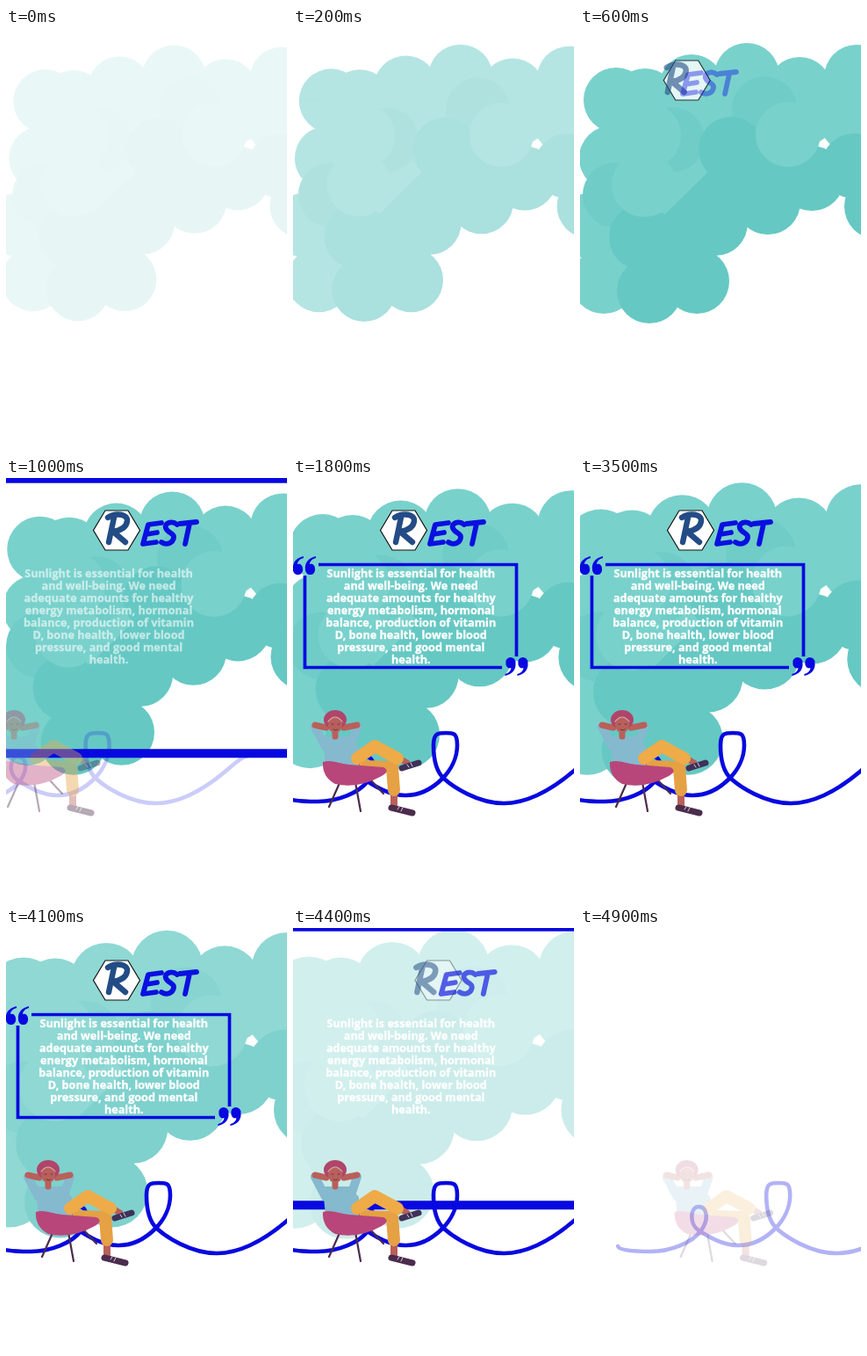
Write an HTML page that moves like this. It is 320x480 px and loops after 5000 ms.

```html
<!DOCTYPE html>
<html lang="en">
<head>
<meta charset="utf-8">
<title>Rest</title>
<style>
  html, body { margin: 0; width: 100%; height: 100%; overflow: hidden; background: #fff; }
  svg { display: block; width: 100vw; height: 100vh; }
  #copy { font: 700 12.65px "Open Sans", sans-serif; fill: #fff; stroke: #fff; stroke-width: .35; text-anchor: middle; }
  .line { fill: none; stroke-linecap: round; stroke-linejoin: round; }
  .blue { stroke: #0808e0; }
  .skin { stroke: #b9605a; }
  .shirt { stroke: #85b9ce; }
  .dark { stroke: #4b2c4d; }
</style>
</head>
<body>
<svg viewBox="0 0 320 480" xmlns="http://www.w3.org/2000/svg">
  <g id="cloud"></g>

  <path id="hex" d="M99.5 59.5 113 37H139L152.5 59.5 139 82H113Z" fill="#fff" stroke="#111" stroke-width="1.2"/>
  <g id="initial" class="line" stroke="#234c86" stroke-width="6.4" role="img" aria-label="R">
    <path d="M123 45 117 73M116 45C125 39 139 41 138 49S128 60 122 61L136 73"/>
  </g>
  <g id="rest" class="line" stroke="#0a10e0" stroke-width="5.8" role="img" aria-label="EST">
    <path d="M177 51 162 53 156 75 171 73M160 64 172 62"/>
    <path d="M195 53C189 48 180 51 182 57S192 62 191 68S183 77 177 73"/>
    <path d="M198 52 217 50M209 52 204 75"/>
  </g>

  <g id="frame">
    <path class="blue" d="M13.5 111V215.5H238M29 98.5H254.5V203" fill="none" stroke-width="3.7"/>
    <g id="quotes" fill="#0808e0">
      <path id="mark" d="M12 89C3 91-1 97 0 104A5.6 5.6 0 1 0 11 103C11 99 8 97 5 98C5 95 8 92 12 91Z"/>
      <use href="#mark" x="14"/>
    </g>
    <use href="#quotes" transform="rotate(180 133.7 157)"/>
  </g>

  <g id="copy"></g>

  <path id="ribbon" class="line blue" stroke-width="4.6" d="M-9 362C-8 366 5 368 28 368S75 358 85 345S93 317 83 317S72 337 83 344
    S110 361 128 361S160 352 170 342S187 318 187 304S183 290 174 290S160 290 160 304S162 333 172 342
    S210 370 240 370S300 350 320 333S340 317 348 315"/>

  <g id="person" class="line">
    <path class="dark" d="M53 347 41 374M71 346 77 379M88 343 103 359" stroke-width="2.2"/>
    <!-- standing leg -->
    <path class="skin" d="M115 360V374" stroke-width="8"/>
    <path d="M82 328 113 329 115 355" stroke="#e5a143" stroke-width="14"/>
    <path class="dark" d="M112 375 136 381" stroke-width="7"/>
    <!-- torso, raised arms and head -->
    <path d="M34 294H64L75 306V328H37Z" fill="#85b9ce"/>
    <path class="shirt" d="M25 283 37 306M73 283 66 304" stroke-width="10"/>
    <path class="skin" d="M25 281 38 284M73 281 58 284M48 284V294" stroke-width="7"/>
    <ellipse cx="48" cy="275" rx="13" ry="11" fill="#b0456a"/>
    <ellipse cx="48" cy="281" rx="8" ry="9" fill="#b9605a"/>
    <path d="M40 277Q48 267 56 277" stroke="#dbb0b8" stroke-width="1.2"/>
    <path class="dark" d="M44 280H46M51 280H53M46 286Q49 288 51 286" stroke-width=".8"/>
    <!-- chair -->
    <path d="M34 323C44 320 52 325 64 326L103 329Q111 333 101 339Q74 354 48 348Q33 340 34 323Z" fill="#b8467a"/>
    <!-- crossed leg -->
    <path class="skin" d="M121 319 130 324" stroke-width="7"/>
    <path d="M73 319 93 305 119 319" stroke="#eeab48" stroke-width="14"/>
    <path d="M124 330 143 324" stroke="#3f3158" stroke-width="7"/>
    <path d="M130 326 132 329M134 324 136 328M121 374 119 377M125 375 123 379" stroke="#ddd0dd"/>
  </g>
</svg>
<script>
const NS = "http://www.w3.org/2000/svg";
const LOOP = 5000, SLIDE = 500, TRAVEL = 109, PUFF = 37;
const byId = id => document.getElementById(id);
const clamp = v => Math.max(0, Math.min(1, v));
const span = (t, start, length) => clamp((t - start) / length);

function add(parent, tag, attrs, text) {
  const el = document.createElementNS(NS, tag);
  for (const key in attrs) el.setAttribute(key, attrs[key]);
  if (text) el.textContent = text;
  parent.append(el);
  return el;
}

const cloud = byId("cloud");
const LIGHT = "#79d1cc", MID = "#6fccc7", DARK = "#66c8c3";

// Equal puffs on every corner of an outline; a body also fills the inside.
function puffs(color, outline, body) {
  const group = add(cloud, "g", { fill: color });
  if (body) add(group, "polygon", { points: outline });
  for (const point of outline.split(" ")) {
    const [cx, cy] = point.split(",");
    add(group, "circle", { cx, cy, r: PUFF });
  }
}
puffs(LIGHT, "41,82 74,83 127,67 190,54 250,70 315,56 310,105 27,288 10,225 36,148", true);
puffs(MID, "105,127 40,190 210,92");
puffs(DARK, "172,138 312,157 338,203 264,171 214,198 154,222 133,288 79,299 70,238", true);
puffs(LIGHT, "78,122 73,178 237,121");

[
  "Sunlight is essential for health", "and well-being. We need", "adequate amounts for healthy",
  "energy metabolism, hormonal", "balance, production of vitamin", "D, bone health, lower blood",
  "pressure, and good mental", "health."
].forEach((line, i) => add(byId("copy"), "text", { x: 134.3, y: 113 + 14 * i }, line));

// Parts slide in from the left one after another and leave to the right in the same order.
const sliders = ["hex", "initial", "rest", "", "", "copy", "person", "ribbon"]
  .map((id, i) => ({ el: byId(id), enter: 200 + 100 * i, leave: 4100 + 65 * i }))
  .filter(part => part.el);

function zoomAbout(el, x, y, s) {
  el.setAttribute("transform", `translate(${x} ${y}) scale(${s}) translate(${-x} ${-y})`);
}

function drawCloud(t) {
  zoomAbout(cloud, 260, 165, (1 + 0.000028 * t) / 1.017);
  cloud.setAttribute("opacity", Math.min(span(t, -75, 500), 1 - span(t, 4000, 600)));
}

function drawFrame(t) {
  const away = 1 - span(t, 600, 600) + span(t, 4200, 600);
  zoomAbout(byId("frame"), 134, 157, 1 + 15.2 * away * away);
  byId("frame").setAttribute("visibility", away < 1 ? "visible" : "hidden");
}

function draw(t) {
  drawCloud(t);
  drawFrame(t);
  for (const { el, enter, leave } of sliders) {
    const before = 1 - span(t, enter, SLIDE), after = span(t, leave, SLIDE);
    el.setAttribute("transform", `translate(${TRAVEL * (after * after - before * before)} 0)`);
    el.setAttribute("opacity", 1 - before - after);
  }
}

const start = performance.now();
function tick() {
  draw((performance.now() - start) % LOOP);
  requestAnimationFrame(tick);
}
draw(0);
requestAnimationFrame(tick);
</script>
</body>
</html>
```
